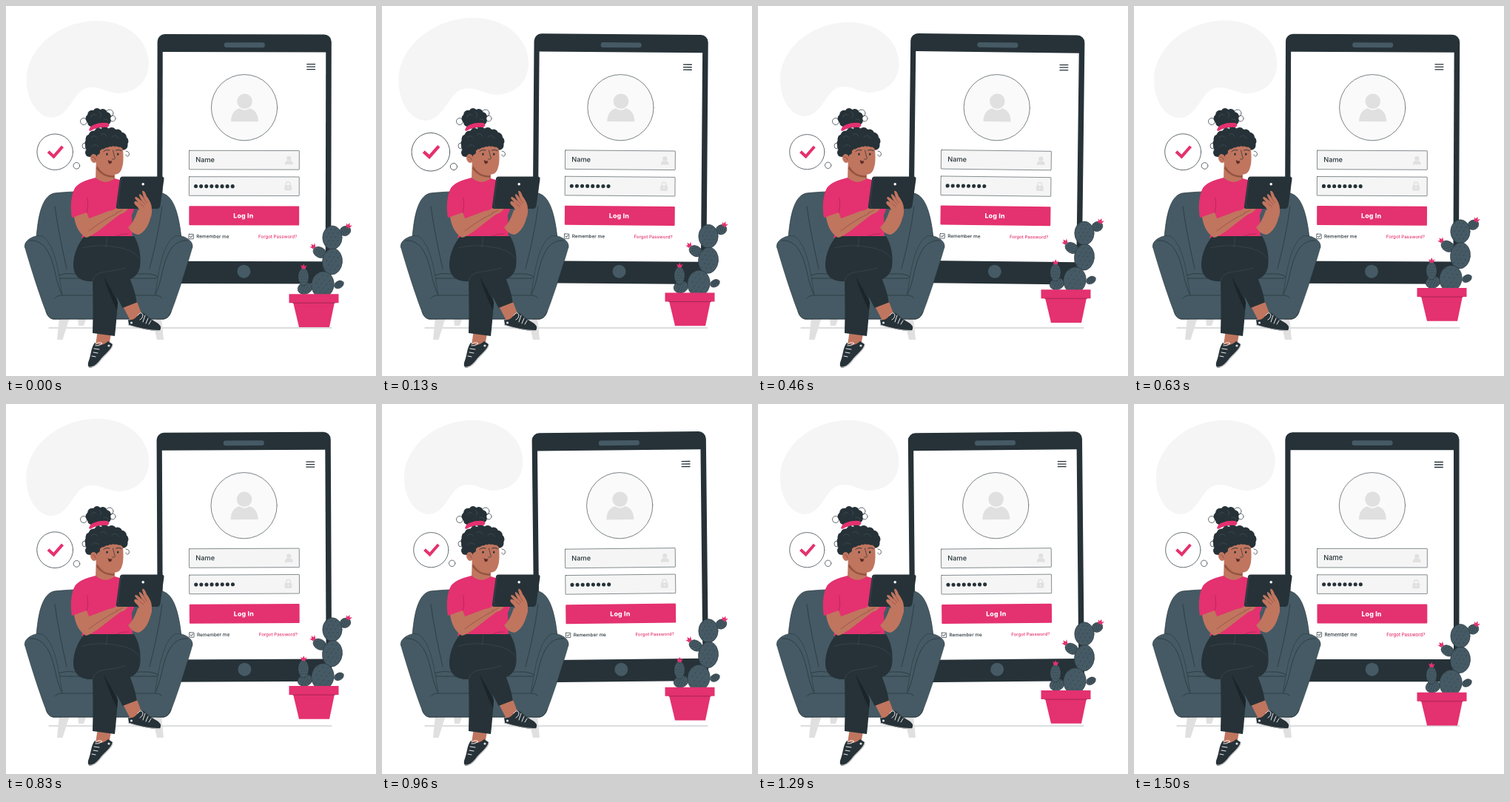
An HTML page with a canvas for the animation above (1.54 s loop, 500 by 500 pixels).

```html
<!DOCTYPE html>
<html lang="en">
<head>
<meta charset="utf-8">
<title>Log in</title>
<style>
html, body { margin: 0; width: 100%; height: 100%; overflow: hidden; background: #fff; }
canvas { display: block; width: 100%; height: 100%; }
</style>
</head>
<body>
<canvas id="stage"></canvas>
<script>
const canvas = document.getElementById('stage');
const ctx = canvas.getContext('2d');
const LOOP = 1540, LEAD = LOOP / 37;
const DARK = '#263238', SLATE = '#455a64', PINK = '#e4316f', SKIN = '#c0755f';
const PALE = '#f5f5f5', GREY = '#e0e0e0', INK = '#1b2429';
const FONT = 'Inter, "Open Sans", sans-serif';

function paint(path, fill, stroke, width = 0.7) {
  if (fill) { ctx.fillStyle = fill; ctx.fill(path); }
  if (stroke) { ctx.strokeStyle = stroke; ctx.lineWidth = width; ctx.stroke(path); }
}
const shape = (d, fill, stroke, width) => paint(new Path2D(d), fill, stroke, width);
const line = (d, color = DARK, width = 0.7) => shape(d, null, color, width);
function oval(x, y, rx, ry, turn, fill, stroke, width) {
  const p = new Path2D();
  p.ellipse(x, y, rx, ry, turn, 0, Math.PI * 2);
  paint(p, fill, stroke, width);
}
const dot = (x, y, r, fill, stroke, width) => oval(x, y, r, r, 0, fill, stroke, width);
function box(x, y, w, h, r, fill, stroke, width) {
  const p = new Path2D();
  p.roundRect(x, y, w, h, r);
  paint(p, fill, stroke, width);
}
function label(text, x, y, size, weight, color, spacing = 0) {
  ctx.font = `${weight} ${size}px ${FONT}`;
  ctx.letterSpacing = spacing + 'px';
  ctx.fillStyle = color;
  ctx.fillText(text, x, y);
}
function around(x, y, change, draw) {
  ctx.save();
  ctx.translate(x, y);
  change();
  ctx.translate(-x, -y);
  draw();
  ctx.restore();
}

// Linear interpolation through [phase, value] stops.
function track(stops, p) {
  const i = Math.max(1, stops.findIndex(s => s[0] >= p));
  const [a, u] = stops[i - 1], [b, v] = stops[i];
  return u + (v - u) * (p - a) / (b - a);
}
const BEAT = [[0, 1], [0.1, 1.1], [0.3, 1], [0.4, 1], [0.5, 1.1], [0.6, 1], [1, 1]];
const SWAY = [[0, 0], [0.25, 1], [0.75, -1], [1, 0]];
const FLOAT = [[0, 0], [0.5, -10], [1, 0]];

function drawBlob() {
  shape('M118 22C155 20 189 42 190.500 76C191 104 171 117 149 117C135 116 124 106 109 110C90 116 87 148 63 149C42 148 29 122 30 97C32 57 72 24 118 22Z', PALE);
}

function drawBubble() {
  dot(66.3, 197.2, 23.6, '#fff', DARK, 0.7);
  dot(94.7, 215.3, 4.2, '#fff', DARK, 0.7);
  ctx.save();
  ctx.lineCap = 'butt';
  ctx.lineJoin = 'miter';
  line('M57.500 196.800L64.600 203.300L76.300 190', PINK, 4);
  ctx.restore();
}

function drawPerson(x, y, s) {
  dot(x, y - 9.5 * s, 10.3 * s, GREY);
  around(x, y, () => ctx.scale(s, s), () => {
    ctx.translate(x, y);
    shape('M-18.500 18C-18.500 8 -14 2 -7 0Q0 5 7 0C14 2 18.500 8 18.500 18Z', GREY);
  });
}

function drawTablet() {
  box(204.3, 38.2, 235.2, 337, 10, DARK);
  box(211.5, 62.3, 220.5, 282.7, 0, '#fff');
  box(294.5, 49.3, 55, 6.8, 3, SLATE);
  dot(321.7, 358.7, 9, SLATE);
  for (const y of [78.5, 82, 85.5]) box(406, y - 0.65, 11.8, 1.3, 0, DARK);

  dot(321.9, 137.2, 44.6, '#fafafa', DARK, 0.6);
  drawPerson(322.4, 138.2, 1);

  for (const y of [195.4, 230.8]) box(247.5, y, 148.8, 25.6, 0.5, PALE, DARK, 0.55);
  label('Name', 256.3, 211, 9.2, 500, DARK);
  drawPerson(382.3, 208.6, 0.3);
  for (let i = 0; i < 8; i++) dot(256.6 + i * 7.1, 243.7, 2.55, DARK);
  box(376.5, 242.2, 9.6, 7, 1, GREY);
  line('M378.500 242.500V240.500A2.800 2.800 0 0 1 384.100 240.500V242.500', GREY, 1.4);
  dot(381.3, 245.5, 1, PALE);

  box(247.5, 270.4, 148.8, 26, 1, PINK);
  label('Log In', 307.4, 286.6, 8.8, 800, '#fff', 0.2);
  box(247.2, 308.5, 6.4, 6.4, 0.5, '#fff', DARK, 0.7);
  line('M248.700 311.600L250 313L252.300 310.200', DARK, 0.9);
  label('Remember me', 257.5, 313.7, 6.4, 500, DARK);
  label('Forgot Password?', 341.3, 313.7, 6.1, 500, PINK);
}

function drawArmrest() {
  shape('M25.500 326C23 317 39 308 49 311C67 322 72 364 77 398Q79 414 74 423H64Q57 422 54 413C45 390 33 352 25.500 326Z', SLATE, DARK, 0.5);
  line('M32 317C54 315 62 340 67 363Q69 374 75 389');
}

function drawChair() {
  shape('M72 421H86L76.500 451H69Z', GREY);
  shape('M197 421H210L213 451H204Z', GREY);
  shape('M97 421H109L105 432H98Z', GREY);
  shape('M41 314C43 286 48 257 65 253C98 249 180 249 211 253C228 257 234 286 237 314L222 390H55Z', SLATE, DARK);
  line('M66 271C70 300 76 328 82 355M211 271C207 300 201 328 194 355');
  shape('M66 366Q78 360 92 362H185Q199 361 207 367L214 423H63Z', SLATE, DARK);
  line('M72 368H204');
  drawArmrest();
  around(138.7, 0, () => ctx.scale(-1, 1), drawArmrest);
  shape('M58 397Q66 391 76 391H201Q211 391 219 397Q219 417 213 422.500H64Q57 418 58 397Z', SLATE);
  line('M66 395Q69 391 76 391H201Q208 391 211 395M54 413Q57 423 64 423H213Q220 422 223 413');
}

function drawHair() {
  for (const [x, y, r] of [[105, 156, 4.5], [140, 145, 5], [144, 152, 4], [107, 189, 4]])
    dot(x, y, r, null, DARK, 0.7);
  // Bun of overlapping curls.
  for (let i = 0; i < 9; i++) {
    const a = i / 9 * Math.PI * 2 + 0.35;
    dot(125 + 11.5 * Math.cos(a), 152 + 8 * Math.sin(a), 6, DARK);
  }
  oval(125, 153, 14, 10, 0, DARK);
  for (let i = 0; i < 12; i++) {
    const a = Math.PI * (0.72 + i * 0.125);
    dot(136 + 23 * Math.cos(a), 184 + 14 * Math.sin(a), 6.6, DARK);
  }
  oval(136, 183, 24, 15, 0, DARK);
  for (const [x, y] of [[113, 190], [113, 198], [119, 200]]) dot(x, y, 6, DARK);
  shape('M112 168Q113 162 120 160Q127 157 137 158Q142 161 137 164Q123 163 114 169Z', PINK);
}

function drawHead() {
  shape('M122 202L121 234Q133 244 147 234V221Z', SKIN);
  shape('M123 216Q132 231 146 229L146 232Q131 232 122 220Z', '#93543f');
  drawHair();
  shape('M123 203C125 191 132 187 141 186C150 186 156 189 158 194C159 205 159 216 155 223C151 230 140 229 132 223C125 218 122 211 123 203Z', SKIN);
  // Curly fringe over the forehead.
  for (let i = 0; i < 7; i++) dot(125 + i * 5.6, 191 - 6 * Math.sin(i * 0.42), 5, DARK);
  dot(123, 197, 4, DARK);
  line('M115 150Q117 144 122 148M126 143Q131 147 127 151M132 154Q137 151 138 156M115 178Q119 173 123 178M128 174Q133 170 136 176M143 177Q149 172 152 179M116 190Q121 185 125 190', '#4f5c62', 0.5);
  oval(118.8, 206, 4.6, 6, -0.25, SKIN);
  line('M117 204Q120 204 121 208', '#7c4435');
  oval(136.5, 200.3, 1.2, 1.8, 0, DARK);
  oval(151.2, 200.3, 1.2, 1.8, 0, DARK);
  line('M132 196.500Q135 193.500 140 195M148.500 195Q152 193 156 195.500', DARK, 0.9);
  line('M144.500 195Q146 202 147.500 206Q146 208 143.500 207', DARK, 0.7);
  shape('M137.500 208Q140 210 143.500 209.500Q142 214.500 139 213Z', '#5b2c27');
  line('M162 196Q168 197 166 202Q163 205 162 201', DARK, 0.7);
}

function drawTorso() {
  shape('M121 232C109 235 96 239 92 248C87 260 87 274 89 286L109 281L107 296L102 313H171L170 282C177 271 177 249 166 240Q156 235 147 233Q134 243 121 232Z', PINK);
  line('M109 280Q112 270 110 259M123 289Q137 283 145 276M149 311Q157 307 165 308', '#9f204e', 0.6);
}

function drawBackArm() {
  shape('M92 285C94 299 100 308 108 313C119 311 140 291 155 281Q163 279 165 273L155 269Q147 276 139 277L112 287L109 279Z', SKIN);
  line('M112 304Q130 290 150 280M149 279Q154 279 157 275', '#83483a', 0.6);
}

function drawFrontArm() {
  shape('M165 299C171 294 175 285 178 276L188 274L196 281C195 293 188 306 179 309Q170 308 165 299Z', SKIN);
  shape('M157 230.500H211Q214 231 213.500 234L208.500 270Q207.500 274 204 274H152Q148 274 149 270L154 233Q154.500 230.500 157 230.500Z', DARK);
  line('M158 232Q155 234 154.500 239L151 270Q151 272 154 272', SLATE, 0.5);
  dot(185.2, 240.8, 1.8, '#fff');
  shape('M181 278Q179 272 175 269Q172 266 174 264Q176 263 181 267Q175 262 174 259Q175 257 178 259L184 264Q179 256 180 254Q183 254 187 261Q184 253 184 250Q187 248 190 257Q197 266 197 274Q198 286 191 291Z', SKIN);
  line('M181 267L186 271M184 264L188 268M187 261L190 266', '#83483a', 0.6);
}

function drawShoe(d, sole, laces) {
  shape(d, DARK);
  line(sole, '#bdbdbd', 1.2);
  line(laces, '#fff', 0.9);
}

function drawLegs() {
  shape('M124 438L142 443L139 459L121 458Z', SKIN);
  shape('M156 402L176 397L184 418L169 427Z', SKIN);
  drawShoe('M120 455Q128 462 138 453L144 457C143 465 132 471 126 480Q118 489 113 489Q109 486 112 479C115 471 115 461 120 455Z',
    'M144 459C142 466 132 472 126 481Q119 489 112 488',
    'M121 457Q126 453 130 456Q126 460 121 459M119 463L126 464M118 468L124 469M116 473L121 474');
  dot(139, 459, 1.6, GREY);
  drawShoe('M165 424Q174 426 180 415Q186 413 190 418C196 425 206 427 209 433Q210 438 206 439C193 439 178 435 166 431Z',
    'M165 431C178 435 194 439 207 438.500',
    'M178 418Q182 412 185 417Q185 422 181 424M188 418L185 427M192 422L189 429M196 425L193 430');
  dot(169.5, 428, 1.6, GREY);

  shape('M106 311H173C180 322 183 337 181 353Q178 366 166 370L145 371L151 400Q149 429 147 446L117 442Q118 409 117 372C102 373 91 366 91 350C91 335 98 320 106 311Z', DARK);
  shape('M117 369Q120 358 136 358L164 361Q173 379 177 400.500L157.500 408C150 393 143 380 133 366Z', DARK);
  line('M117 372Q119 360 135 359Q148 358 161 354M103 327Q126 321 150 326Q172 329 180 341M137 313L135 326', '#465359', 0.5);
  shape('M132 366Q142 382 151 401L150 411Q138 386 132 366Z', INK);
}

function drawWoman() {
  drawHead();
  drawTorso();
  drawLegs();
  drawBackArm();
  drawFrontArm();
}

function drawPad(x, y, rx, ry, turn = 0) {
  oval(x, y, rx, ry, turn, SLATE, DARK, 0.6);
  around(x, y, () => ctx.rotate(turn), () => {
    // Spines in staggered rows.
    for (let v = -0.65, odd = 0; v <= 0.7; v += 0.32, odd ^= 1)
      for (let u = -0.6 + odd * 0.22; u < 0.65; u += 0.45)
        line(`M${x + u * rx} ${y + v * ry}l0.800 -1.300`, DARK, 0.5);
  });
}
function drawFlower(x, y, turn) {
  around(x, y, () => ctx.rotate(turn), () =>
    shape(`M${x - 2} ${y + 3}l-2 -5l2.500 1.500l1.500 -3.500l1.800 3.500l2.700 -2l-2 5.500z`, PINK));
}

function drawCactus() {
  drawPad(404, 382, 10, 8, -0.3);
  drawPad(402, 366.5, 7.2, 12);
  drawPad(450, 377, 6.8, 4.8, -0.5);
  drawPad(458.5, 304.5, 7.5, 6.5, -0.4);
  drawPad(424, 333.5, 9.5, 7, 0.5);
  drawPad(441, 313.5, 13.2, 16);
  drawPad(441, 346, 13.5, 17.7, 0.1);
  drawPad(428, 377, 15.2, 17.7, 0.15);
  drawFlower(462.8, 297.3, 0.4);
  drawFlower(414.7, 325.3, -0.6);
  drawFlower(402, 352.8, 0.1);
  shape('M388 401H444L437 434.500H396Z', PINK);
  box(382.5, 389.7, 67, 12, 0, PINK);
  line('M387.500 401.800H444.500', '#8c1f48', 0.7);
}

function render(now) {
  const w = Math.round(innerWidth * devicePixelRatio), h = Math.round(innerHeight * devicePixelRatio);
  if (canvas.width !== w || canvas.height !== h) { canvas.width = w; canvas.height = h; }
  ctx.setTransform(w / 500, 0, 0, h / 500, 0, 0);
  ctx.fillStyle = '#fff';
  ctx.fillRect(0, 0, 500, 500);
  ctx.lineCap = ctx.lineJoin = 'round';

  const p = (now + LEAD) % LOOP / LOOP;
  const beat = track(BEAT, p);
  const pulse = () => ctx.scale(beat, beat);
  around(110.2, 85.5, pulse, drawBlob);
  line('M58 435H440', '#a4aaad', 0.8);
  around(321.8, 206.6, () => ctx.rotate(track(SWAY, p) * Math.PI / 180), drawTablet);
  around(70.8, 196.7, pulse, drawBubble);
  drawChair();
  drawWoman();
  around(0, 0, () => ctx.translate(0, track(FLOAT, p)), drawCactus);
}

const start = performance.now();
function tick() {
  render(performance.now() - start);
  requestAnimationFrame(tick);
}
tick();
</script>
</body>
</html>
```
